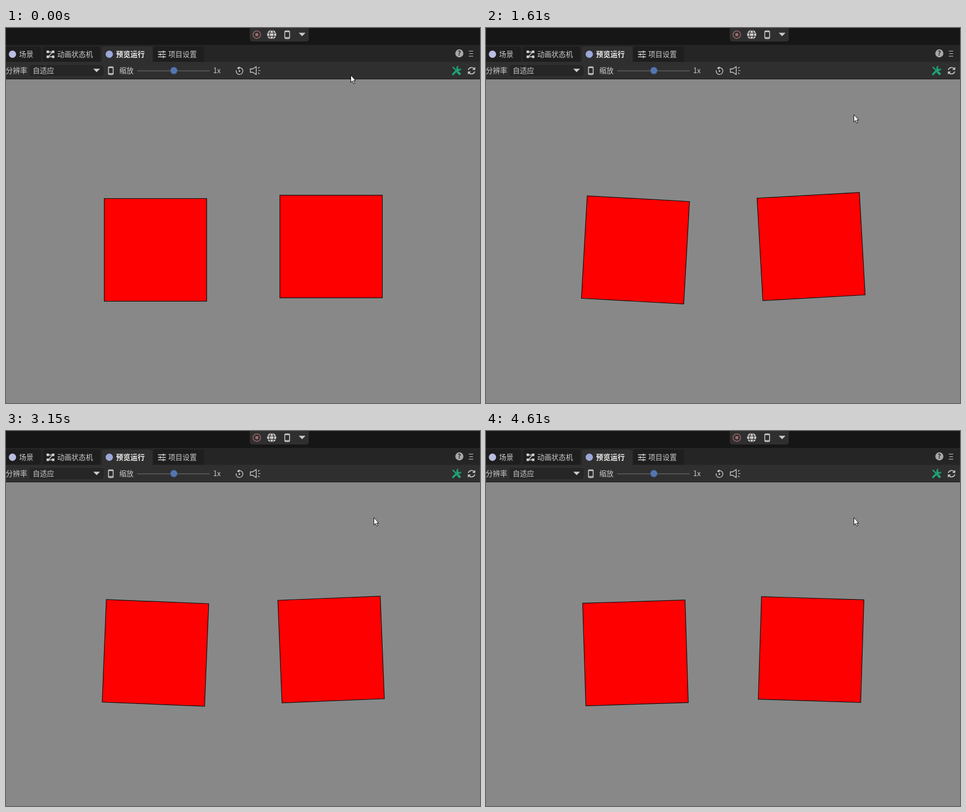
Animation, 842 px wide and 665 px high, one loop 4.69 s. Source, as an HTML page:

```html
<!DOCTYPE html>
<html lang="zh-CN">
<head>
<meta charset="utf-8">
<title>Rotating squares</title>
<style>
  html, body { margin: 0; width: 100%; height: 100%; overflow: hidden; background: #888; }
  svg { display: block; }
  text { font: 12.7px "Noto Sans CJK SC", "Noto Sans CJK", sans-serif; fill: #ccc; }
  .line { fill: none; stroke: #ccc; stroke-width: 1.5; }
  .solid { fill: #ccc; }
  .box { fill: #f00; stroke: #111; stroke-width: 1.2; }
</style>
</head>
<body>
<svg width="842" height="665" viewBox="0 0 842 665">
  <defs>
    <g id="phone">
      <rect x=".8" y=".8" width="8.4" height="13.4" rx="1.4" class="line"/>
      <path d="M1 2H9M1 12.5H9" class="line"/>
    </g>
    <path id="down" d="M0 0H12L6 6Z" class="solid"/>
  </defs>

  <!-- bars and tabs -->
  <rect width="842" height="30" fill="#161616"/>
  <rect y="30" width="842" height="31" fill="#252525"/>
  <rect y="60" width="842" height="30" fill="#2f2f2f"/>
  <rect y="90" width="842" height="1" fill="#171717"/>
  <path d="M433 0H538V19Q538 24 533 24H438Q433 24 433 19Z" fill="#2f2f2f"/>
  <g fill="#1e1e1e">
    <path d="M0 33H58Q62 33 62 37V60H0Z"/>
    <path d="M66 60V37Q66 33 70 33H163Q167 33 167 37V60Z"/>
    <path d="M262 60V37Q262 33 266 33H348Q352 33 352 37V60Z"/>
  </g>
  <path d="M170 60V37Q170 33 174 33H256Q260 33 260 37V60Z" fill="#2f2f2f"/>

  <!-- run controls -->
  <g fill="none" stroke="#a56d6d" stroke-width="1.3">
    <circle cx="445.5" cy="11.8" r="6.7"/>
    <rect x="443" y="9.3" width="5" height="5" fill="#a56d6d" stroke="none"/>
  </g>
  <circle cx="472" cy="11.8" r="8.2" class="solid"/>
  <g fill="none" stroke="#2f2f2f" stroke-width="1.2">
    <ellipse cx="472" cy="11.8" rx="3.7" ry="8.2"/>
    <path d="M463 9H481M463 14.6H481"/>
  </g>
  <use href="#phone" x="494.5" y="4.5"/>
  <use href="#down" x="520" y="8.5"/>

  <!-- tab row -->
  <circle cx="11.5" cy="46.5" r="6.5" fill="#b9bde0"/>
  <text x="23.3" y="51.2">场景</text>
  <path d="M75 42.5H83L75 51H83" class="line"/>
  <path d="M72 40h4.5v4.5h-4.5zM81.5 40h4.5v4.5h-4.5zM72 48.7h4.5v4.5h-4.5zM81.5 48.7h4.5v4.5h-4.5z" class="solid"/>
  <text x="91" y="51.2">动画状态机</text>
  <circle cx="183.5" cy="46.5" r="6.5" fill="#9ba8d8"/>
  <text x="195.6" y="51.2" style="font-weight:bold;fill:#eee">预览运行</text>
  <path d="M270 42.3H284M270 46.8H284M270 51.3H284M279.5 40V44.6M274 44.5V49.1M279.5 49V53.6" class="line"/>
  <text x="288.2" y="51.2">项目设置</text>
  <circle cx="805.3" cy="45" r="7.2" fill="#a8a8a8"/>
  <text x="805.3" y="49.2" text-anchor="middle" style="font-size:11.5px;font-weight:bold;fill:#252525">?</text>
  <path d="M822 41H830M823 45.5H829.5M822 50H830" class="line" style="stroke-width:1.2"/>

  <!-- tool row -->
  <text x="-.4" y="80">分辨率</text>
  <rect x="42.5" y="66.5" width="130" height="18" rx="3" fill="#262626" stroke="#232323"/>
  <text x="47.5" y="80">自适应</text>
  <use href="#down" x="155" y="72.3"/>
  <use href="#phone" x="181.2" y="68.3"/>
  <text x="201.3" y="80">缩放</text>
  <path d="M233 76H362" stroke="#777"/>
  <circle cx="298.2" cy="75.5" r="6.3" fill="#5575b0" stroke="#3c4a66" stroke-width=".8"/>
  <text x="368" y="80">1x</text>
  <path d="M411.5 71.3A6 6 0 1 1 409 74.8" class="line" style="stroke-width:1.3"/>
  <path d="M414.5 68.3V74L410.5 71.2Z" class="solid"/>
  <circle cx="414.7" cy="76.5" r="1.4" class="solid"/>
  <path d="M434 72.5H438L444.5 68.5V82.5L438 78.5H434Z" class="line" style="stroke-width:1.3"/>
  <path d="M447.5 71.5L450.5 69.5M448 75.5H452M447.5 79.5L450.5 81.5" class="line" style="stroke-width:1.2"/>
  <g fill="none" stroke="#1fa37a">
    <path d="M793.5 69L800.5 76" stroke-width="2.4"/>
    <path d="M801.5 77L807 82.5" stroke-width="4"/>
    <path d="M793 83L804 72" stroke-width="3.2"/>
    <path d="M803.5 67.8A3.6 3.6 0 1 0 808 72.5" stroke-width="2.2"/>
  </g>
  <path d="M821.2 74.5A6 6 0 0 1 831.8 72.5M832.8 77A6 6 0 0 1 822.2 79" class="line"/>
  <path d="M833.5 69V74.3H828.2ZM820.5 82.5V77.2H825.8Z" class="solid"/>

  <!-- moving parts -->
  <rect id="left" class="box" x="-91" y="-91" width="182" height="182"/>
  <rect id="right" class="box" x="-91" y="-91" width="182" height="182"/>
  <path id="cursor" d="M-.5 .7V13.6L2.4 10.9L4.5 15.7L6.6 14.8L4.5 10.1H8.2Z" fill="#fff" stroke="#000" stroke-width=".9"/>
</svg>
<script>
const LOOP = 4690, STEP = 76.85, LAST = 60;

// Each key is [step, value].
const ANGLE = [[0, 0], [7, 30.3], [14, 62], [27, 120], [35, 155.4], [48, 213.7], [LAST, 268.2]];
const CURSOR_X = [[0, 613], [7, 646], [9, 654], [LAST, 654]];
const CURSOR_Y = [[0, 83], [7, 142], [9, 153], [LAST, 153]];

function valueAt(keys, n) {
  const i = Math.max(1, keys.findIndex(key => key[0] >= n));
  const [n0, v0] = keys[i - 1], [n1, v1] = keys[i];
  return v0 + (v1 - v0) * (n - n0) / (n1 - n0);
}

function place(id, x, y, angle = 0) {
  document.getElementById(id).setAttribute('transform', `translate(${x} ${y}) rotate(${angle})`);
}

function draw() {
  const time = performance.now() % LOOP;
  // Step starts are rounded down to hundredths of a second.
  const n = Math.min(LAST, Math.floor((Math.floor(time / 10) * 10 + 9.99) / STEP));
  const angle = valueAt(ANGLE, n);
  place('left', 265.5, 393.5, angle);
  place('right', 577.5, 387.5, -angle);
  place('cursor', Math.round(valueAt(CURSOR_X, n)), Math.round(valueAt(CURSOR_Y, n)));
  requestAnimationFrame(draw);
}
draw();
</script>
</body>
</html>
```
